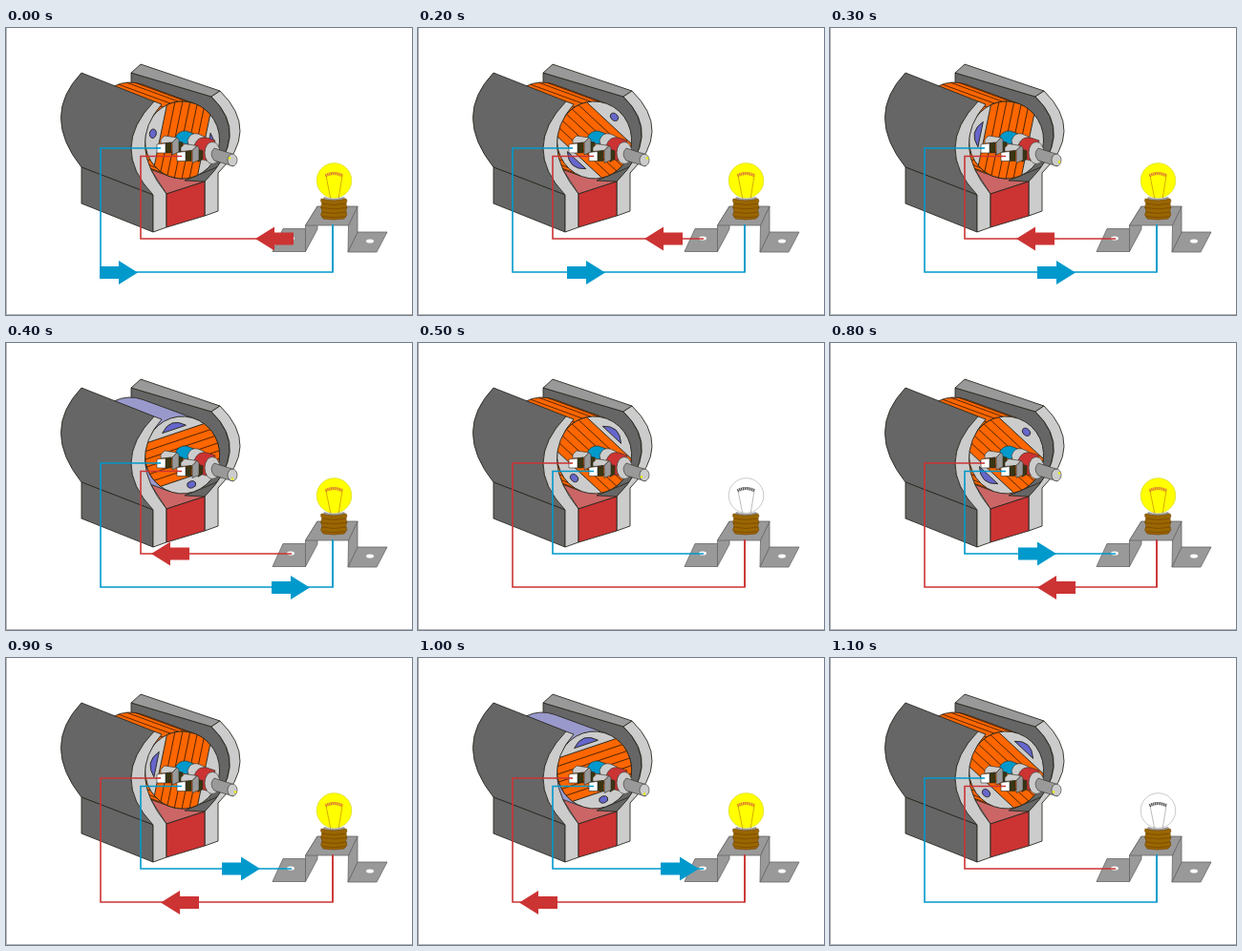
Recreate the animation shown at these times as an HTML page. Size 425 px wide and 301 px high, loop 1200 ms.

```html
<!DOCTYPE html>
<html lang="en">
<head>
<meta charset="utf-8">
<title>Generator and lamp</title>
<style>
  html, body { margin: 0; width: 100%; height: 100%; overflow: hidden; background: #fff; }
  svg { display: block; width: 425px; height: 301px; }
  .ink { stroke: #2a2a22; stroke-width: .9; stroke-linejoin: round; }
  .fine { stroke-width: .6; }
  .dark { fill: #666; }
  .mid { fill: #999; }
  .light { fill: #ccc; }
  .winding { fill: #f60; }
  .slots { fill: none; stroke: #4a2200; stroke-width: .9; }
  .hole { fill: #66c; }
  .wire { fill: none; stroke-width: 1.6; }
  .filament { fill: none; stroke-width: .8; }
</style>
</head>
<body>
<svg viewBox="0 0 425 301">
  <path d="M.5 0V301M0 300.5H425" stroke="#b4b4b4" fill="none"/>

  <!-- right half of the housing -->
  <g class="ink">
    <path class="dark" d="M131 47L215 72Q256 112 208 162L150 150L131 60Z"/>
    <path class="mid" d="M141 38L224 66L215 72L131 47Z"/>
  </g>

  <!-- lower pole -->
  <path class="ink" fill="#c66" d="M150 146L190 150L208 161L168 174Z"/>
  <path class="ink dark" d="M187 160L228 143L222 152L208 161Z"/>

  <!-- rotor -->
  <path id="drum" class="ink"/>
  <path id="ribs" class="slots"/>
  <g id="face">
    <circle class="ink light" r="40.5"/>
    <path id="band" class="winding ink"/>
    <path id="slots" class="slots"/>
    <ellipse class="hole ink" cx="32.5" rx="3.6" ry="4.8"/>
    <path class="hole ink" d="M-28.5 -13.5Q-42 0 -28.5 13.5Z"/>
  </g>

  <!-- left half of the housing and the front rim -->
  <g class="ink">
    <path class="dark" d="M79 47L155 77Q107.500 126 154 175L79 146Q36 92 79 47Z"/>
    <path class="dark" d="M79 146L154 175V214L79 184Z"/>
    <path class="light" d="M155 77L163 80Q125.500 122 168 174V209L154 214V175Q107.500 126 155 77Z"/>
    <path class="light" d="M224 66Q267 108 222 152V192L208 197V161Q257 112 215 72Z"/>
    <path fill="#c33" d="M168 174L208 161V197L168 209Z"/>
  </g>

  <!-- slip rings and shaft -->
  <g class="ink fine">
    <path fill="#09c" d="M177 115Q181 107 189 108L197 111L190 122L180 120Z"/>
    <path class="light" d="M190 118Q193 109 201 111L208 114L202 130L192 126Z"/>
    <path fill="#c33" d="M197 123Q201 113 210 115L219 118L213 140L199 136Z"/>
    <ellipse class="light" cx="216" cy="131" rx="8" ry="11.500"/>
    <path class="mid" d="M218 126L238 132.500V145L218 139Q212 132 218 126Z"/>
    <ellipse class="light" cx="237" cy="138.500" rx="5" ry="6.300"/>
  </g>
  <circle id="mark" r="1.300" fill="#ee0"/>

  <path id="wireA" class="wire" d="M162 126H99V256H342V206"/>

  <!-- brushes -->
  <defs>
    <g id="brush" class="ink fine">
      <path fill="#3a3513" d="M22 -3L27 -2V7L22 10Z"/>
      <path class="light" d="M4 -1V-5L8 -9L21 -7L16 -2Z"/>
      <path class="mid" d="M16 -2L21 -7L23 -5V8L16 11Z"/>
      <path fill="#3a3513" d="M9 -1L15 -2V9L9 9Z"/>
      <path fill="#fff" d="M0 0L9 -1V9L0 9Z"/>
    </g>
  </defs>
  <use href="#brush" x="158" y="122"/>
  <use href="#brush" x="179" y="130.500"/>
  <path id="stubA" class="wire" d="M157 126H162"/>

  <!-- lamp stand -->
  <g class="mid" stroke="#666" stroke-width=".8">
    <path d="M290 210.500H313.500V234.500H279Z"/>
    <path d="M313.500 207L326 187V211L313.500 234.500Z"/>
    <path d="M368 214H399L388 235H358Z"/>
    <path d="M358.500 207L368 187V214L358 235Z"/>
    <path d="M326 187H368L358.500 207H313.500Z"/>
  </g>
  <ellipse cx="298" cy="220.500" rx="4" ry="2" fill="#fff"/>
  <ellipse cx="381" cy="223.500" rx="4" ry="2" fill="#fff"/>
  <path d="M342 206V256" class="wire" id="riser"/>
  <path id="wireB" class="wire" d="M184 134.500H141V221H299"/>

  <!-- lamp -->
  <circle id="bulb" cx="343.500" cy="160" r="18.300" stroke-width=".8"/>
  <g id="filament" class="filament">
    <path d="M340 180L335 155M348 180L352 155"/>
    <path id="coil" d="M334.500 155Q343 150 352.500 155" stroke-width="3.200" stroke-dasharray="1.300 .6"/>
  </g>
  <path class="mid" d="M333 177Q343 181 354 177L356 181H331Z"/>
  <path fill="#960" stroke="#740" stroke-width=".6"
    d="M330 179Q343 183 356 179L357 181.500L355.500 184L357 188L355.500 192L357 196L354 200Q343 202 332 200L329.500 196L331 192L329.500 188L331 184L329.500 181.500Z"/>
  <path fill="none" stroke="#740" stroke-width=".7"
    d="M330 184Q343 187 357 184M330 188.500Q343 191 357 188.500M330 193Q343 196 357 193M331 197.500Q343 200 356 197.500"/>

  <path id="arrowA" d="M20 0L0 -12.500V-6.500H-20V6.500H0V12.500Z"/>
  <path id="arrowB" d="M20 0L0 -12.500V-6.500H-20V6.500H0V12.500Z"/>
</svg>

<script>
  const STEP = 100, STEPS = 12;
  const BLUE = '#0099cc', RED = '#cc3333';
  const R = 40.5, SQUEEZE = .965, HALF = 24;
  const FRONT = [184.5, 117.5], BACK = [130, 97.5];
  // Arrow centres on the outer (a) and inner (b) wire for each half turn
  const PATHS = [
    { a: [118, 147, 176, 237, 298], b: [281, 269, 257, 215, 172] },
    { a: [321, 293, 237, 182, 126], b: [161, 189, 217, 246, 274] }
  ];

  const $ = id => document.getElementById(id);
  const set = (id, attrs) => {
    for (const key in attrs) $(id).setAttribute(key, attrs[key]);
  };
  const rad = deg => deg * Math.PI / 180;
  const rim = ([x, y], deg) =>
    (x + SQUEEZE * R * Math.cos(rad(deg))).toFixed(2) + ' ' + (y + R * Math.sin(rad(deg))).toFixed(2);

  // Angles of the drum side turned towards the viewer
  const axis = Math.atan2(BACK[1] - FRONT[1], (BACK[0] - FRONT[0]) / SQUEEZE) * 180 / Math.PI;
  const first = axis - 90, last = axis + 90;

  const chordEnd = x => Math.sqrt(R * R - x * x);
  const chord = x => `M${x} ${-chordEnd(x)}V${chordEnd(x)}`;

  function buildFixedParts() {
    const h = chordEnd(HALF);
    set('band', { d: `M${-HALF} ${-h}A${R} ${R} 0 0 1 ${HALF} ${-h}V${h}A${R} ${R} 0 0 1 ${-HALF} ${h}Z` });
    set('slots', { d: [-16, -8, 0, 8, 16].map(chord).join('') });
    const backArc = `${rim(BACK, last)}A${SQUEEZE * R} ${R} 0 0 0 ${rim(BACK, first)}`;
    set('drum', { d: `M${rim(FRONT, last)}L${backArc}L${rim(FRONT, first)}Z` });
    let ribs = '';
    for (let deg = last - 12; deg > first; deg -= 13) ribs += `M${rim(FRONT, deg)}L${rim(BACK, deg)}`;
    set('ribs', { d: ribs });
  }

  function drawRotor(turn) {
    const angle = -168 + 60 * turn;
    set('face', { transform: `translate(${FRONT}) scale(${SQUEEZE} 1) rotate(${angle})` });

    // The bare core shows only when a gap in the winding faces up
    const bare = Math.abs(Math.sin(rad(angle))) > .9;
    set('drum', { fill: bare ? '#9999cc' : '#ff6600' });
    set('ribs', { visibility: bare ? 'hidden' : 'visible' });

    const dot = rad(-90 + 60 * (turn - 1));
    set('mark', { cx: 237 + 3.5 * Math.cos(dot), cy: 138.5 + 4 * Math.sin(dot) });
  }

  function drawCircuit(step) {
    const swapped = step >= 5 && step < 11;
    const lit = step % 6 !== 5;
    const colorA = swapped ? RED : BLUE, colorB = swapped ? BLUE : RED;
    for (const id of ['wireA', 'stubA', 'riser']) set(id, { stroke: colorA });
    set('wireB', { stroke: colorB });
    set('bulb', { fill: lit ? '#ff0' : '#fff', stroke: lit ? '#dd3' : '#bbb' });
    set('filament', { stroke: lit ? '#c90' : '#aaa' });
    set('coil', { stroke: lit ? '#d73' : '#555' });

    const spots = PATHS[swapped ? 1 : 0], i = step % 6;
    const place = (id, x, y, flip, fill) => set(id, {
      visibility: lit ? 'visible' : 'hidden', fill,
      transform: `translate(${lit ? x : 0} ${y}) scale(${flip ? -1 : 1} 1)`
    });
    place('arrowA', spots.a[i], 256.5, swapped, colorA);
    place('arrowB', spots.b[i], 221, !swapped, colorB);
  }

  let shown = -1;
  function tick(now) {
    const step = Math.floor(now / STEP) % STEPS;
    if (step !== shown) {
      shown = step;
      drawRotor(step % 6);
      drawCircuit(step);
    }
  }

  buildFixedParts();
  const start = performance.now();
  (function loop() {
    tick(performance.now() - start);
    requestAnimationFrame(loop);
  })();
</script>
</body>
</html>
```
